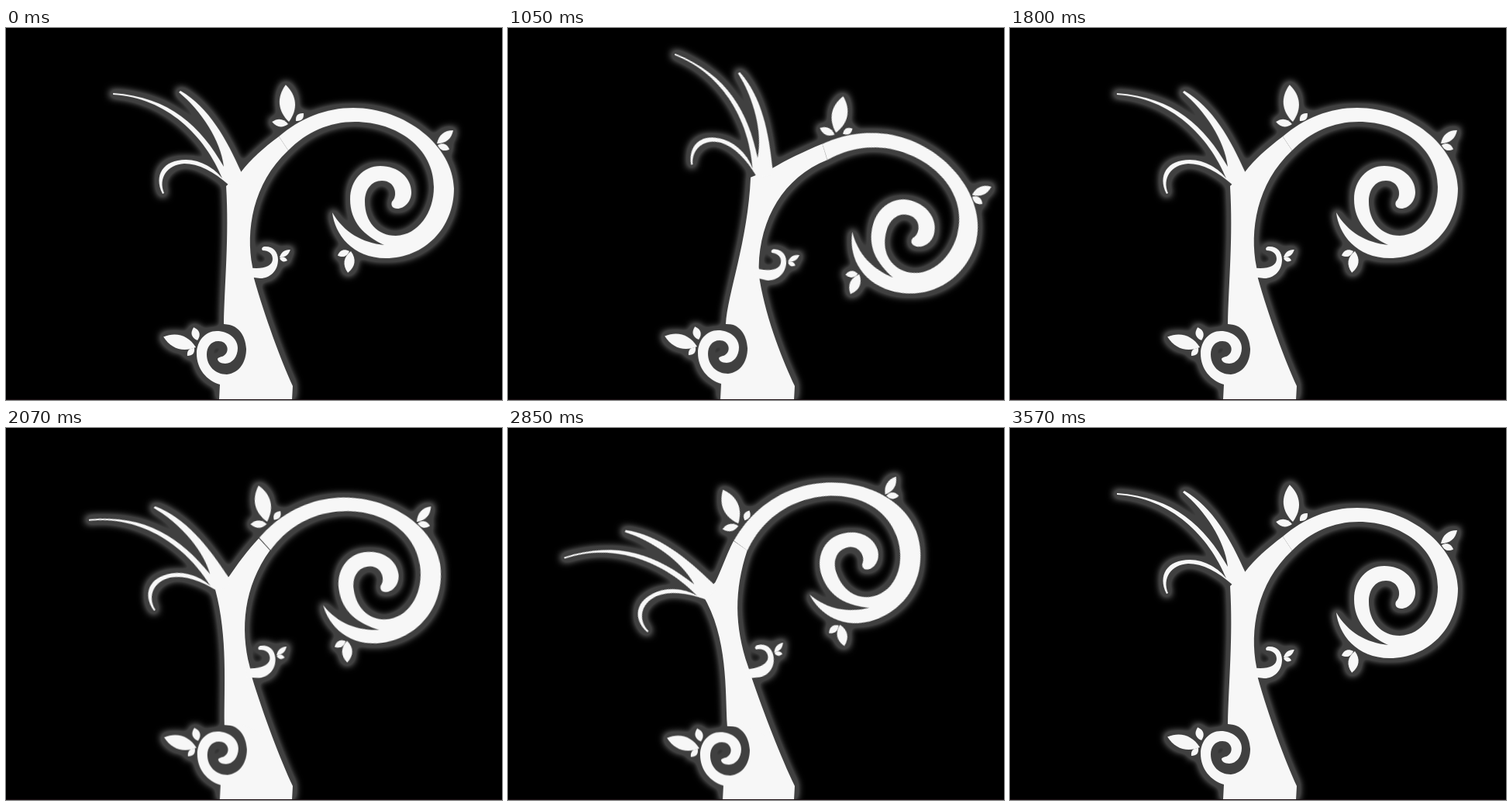
Recreate the animation shown at these times as an HTML page without scripts. Size 640x480 px, loop 3600 ms.

```html
<!DOCTYPE html>
<html lang="en">
<head>
<meta charset="utf-8">
<title>Swaying tree</title>
<style>
  html, body { margin: 0; width: 100%; height: 100%; overflow: hidden; background: #000; }
  svg { display: block; width: 640px; height: 480px; fill: #f7f7f7; }

  .part { animation: sway 3.6s infinite; }
  .trunk { animation: bend 3.6s infinite; }

  /* Each part holds its two extreme poses; the rest pose is the drawn one. */
  .branch, .twigs { transform-origin: 304px 187px; }
  .branch {
    --right: translate(45px, -6px) rotate(17.3deg);
    --left: translate(-45px, 20px) rotate(-20.8deg);
  }
  .twigs {
    --right: translate(40px, -5px) rotate(19.2deg);
    --left: translate(-42px, 14.5px) rotate(-23.3deg);
  }
  .curl {
    transform-origin: 318px 315px;
    --right: translate(6.8px, 1.5px) rotate(6.8deg);
    --left: translate(-4.7px, 1px) rotate(-13.5deg);
  }
  .root {
    --right: translate(-1px, -1px);
    --left: translate(2px, 1.5px);
  }

  @keyframes sway {
    0%, 50% { transform: translate(0, 0) rotate(0deg); animation-timing-function: cubic-bezier(.35, .42, .68, 1); }
    24.5% { transform: var(--right); animation-timing-function: cubic-bezier(.32, 0, .65, .58); }
    74.5% { transform: var(--left); animation-timing-function: cubic-bezier(.32, 0, .65, .58); }
    49.17%, 99.17%, 100% { transform: translate(0, 0) rotate(0deg); animation-timing-function: linear; }
  }
  @keyframes bend {
    0%, 50% {
      d: path("M369 480L370 462C356 432 333 370 320 323L318 308C309 262 318 201 364 158L352 140C332 155 316 169 303 186L284 204C288 270 282 330 281 382L300 383L320 400L320 480Z");
      animation-timing-function: cubic-bezier(.35, .42, .68, 1);
    }
    24.5% {
      d: path("M369 480L370 462C356 432 334 380 325 325L324 308C326 245 358 192 415 171L409 150C384 160 362 170 343 181L315 192C311 275 283 345 281 382L300 383L320 400L320 480Z");
      animation-timing-function: cubic-bezier(.32, 0, .65, .58);
    }
    74.5% {
      d: path("M369 480L370 462C352 425 330 368 314 322L309 307C291 255 290 210 305 158L287 146C278 165 272 186 265 200L249 216C284 270 280 340 283 385L301 386L320 400L320 480Z");
      animation-timing-function: cubic-bezier(.32, 0, .65, .58);
    }
    49.17%, 99.17%, 100% {
      d: path("M369 480L370 462C356 432 333 370 320 323L318 308C309 262 318 201 364 158L352 140C332 155 316 169 303 186L284 204C288 270 282 330 281 382L300 383L320 400L320 480Z");
      animation-timing-function: linear;
    }
  }
</style>
</head>
<body>
<svg viewBox="0 0 640 480">
  <defs>
    <path id="leaf" d="M0 0C32-29 68-29 100 0C68 29 32 29 0 0Z"/>
    <filter id="glow" filterUnits="userSpaceOnUse" x="0" y="0" width="640" height="480" color-interpolation-filters="sRGB">
      <feMorphology in="SourceAlpha" operator="dilate" radius="4"/>
      <feGaussianBlur stdDeviation="5"/>
      <feComponentTransfer result="halo">
        <feFuncA type="linear" slope="2.4"/>
      </feComponentTransfer>
      <feFlood flood-color="#404040"/>
      <feComposite in2="halo" operator="in"/>
      <feMerge>
        <feMergeNode/>
        <feMergeNode in="SourceGraphic"/>
      </feMerge>
    </filter>
  </defs>

  <rect width="640" height="480" fill="#000"/>
  <g filter="url(#glow)">
    <path class="trunk" d="M369 480L370 462C356 432 333 370 320 323L318 308C309 262 318 201 364 158L352 140C332 155 316 169 303 186L284 204C288 270 282 330 281 382L300 383L320 400L320 480Z"/>

    <g class="part root">
      <path d="M274 500L275 479L276 460C259 455 246 440 246 420C246 404 257 391 272 391C287 391 299 401 299 413C299 424 292 433 283 433C277 433 273 430 273 427C274 424 279 425 282 422C289 417 286 404 274 404C264 404 259 412 259 421C259 436 270 447 285 447C302 445 310 430 310 414C309 396 299 382 281 382L300 380L330 395V500Z"/>
      <use href="#leaf" transform="translate(245 412) rotate(198) scale(.44 .4)"/>
      <use href="#leaf" transform="translate(247 403) rotate(-106) scale(.175 .23)"/>
      <use href="#leaf" transform="translate(243 413) rotate(132) scale(.135 .17)"/>
    </g>

    <g class="part curl">
      <path d="M312 309C330 312 344 308 344 298C344 291 339 287 331 287C329 284 331 282 335 282C345 282 351 289 351 299C351 313 341 323 328 323L312 321Z"/>
      <use href="#leaf" transform="translate(353 296) rotate(-36) scale(.17 .15)"/>
      <use href="#leaf" transform="translate(353 297) rotate(17) scale(.105 .13)"/>
    </g>

    <path class="part twigs" d="M288 203C268 185 248 175 230 175C208 176 196 194 204 213L202 214C190 190 203 170 232 170C252 170 270 182 279 194C257 140 208 90 138 86L138 84C212 89 251 127 281 179C277 145 252 107 223 83L225 81C262 103 284 142 304 187L304 195Z"/>

    <g class="part branch">
      <path d="M352 140C380 116 413 103 448 103C515 103 577 152 578 207C578 258 540 297 490 297C447 297 424 266 421 238C436 264 460 277 488 280C462 268 444 250 444 221C444 196 461 178 483 178C506 178 523 193 523 212C523 224 514 233 505 233C499 233 496 229 498 224C506 217 503 197 485 197C471 197 463 209 463 224C463 250 479 268 503 268C532 267 552 238 552 205C552 155 505 121 450 121C417 121 388 134 364 158Z"/>
      <use href="#leaf" transform="translate(365 121) rotate(-95) scale(.48 .46)"/>
      <use href="#leaf" transform="translate(364 124) rotate(188) scale(.21 .22)"/>
      <use href="#leaf" transform="translate(374 120) rotate(-45) scale(.14 .19)"/>
      <use href="#leaf" transform="translate(556 149) rotate(-39) scale(.27 .25)"/>
      <use href="#leaf" transform="translate(557 151) rotate(20) scale(.16 .19)"/>
      <use href="#leaf" transform="translate(445 288) rotate(98) scale(.28 .3)"/>
      <use href="#leaf" transform="translate(443 288) rotate(160) scale(.16 .19)"/>
    </g>
  </g>
  <rect y="479" width="640" height="1" fill="#1c1014"/>
</svg>
</body>
</html>
```
